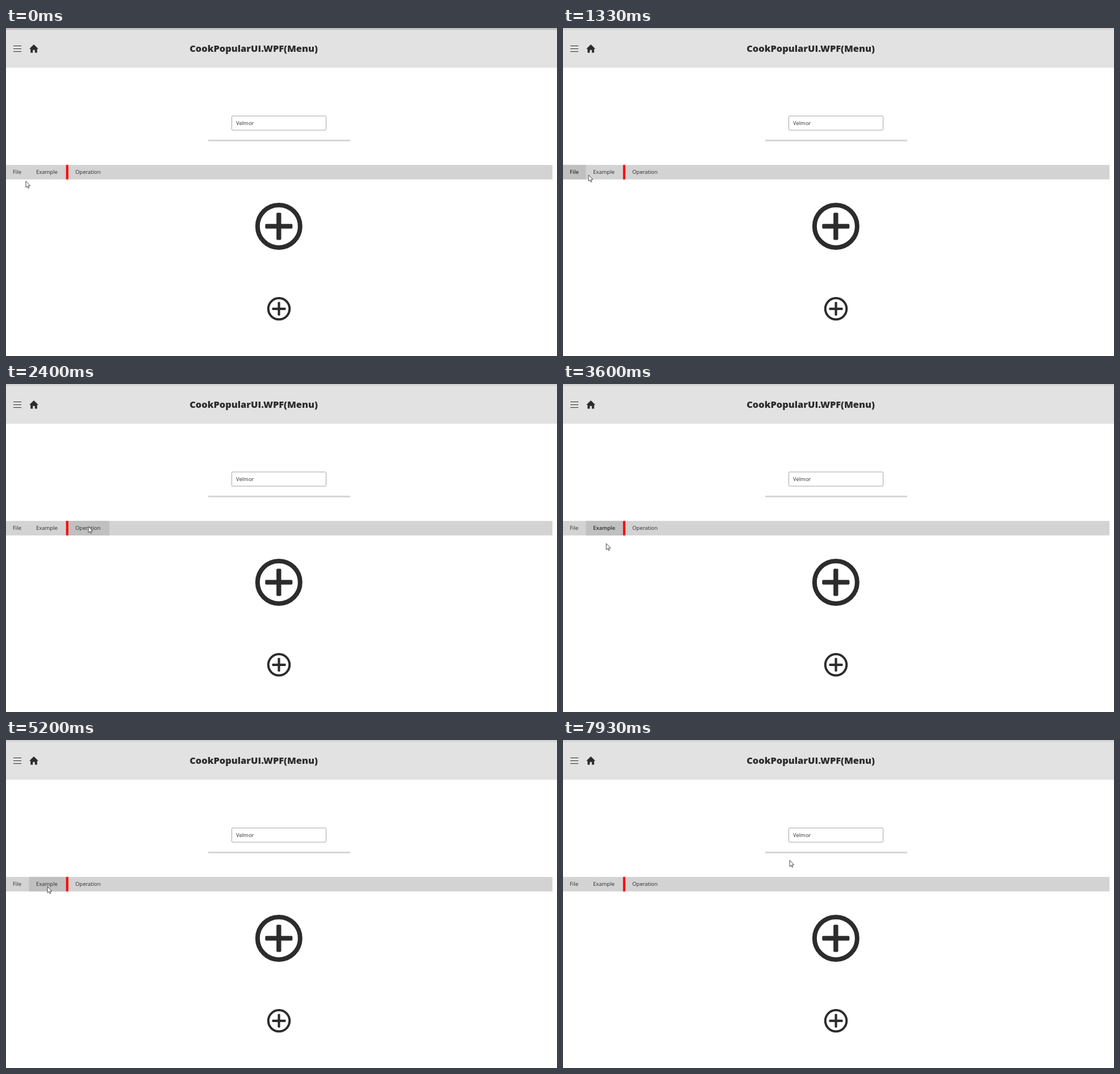
An HTML page for the animation above (8000 ms loop, 970 by 578 pixels).

```html
<!DOCTYPE html>
<html lang="en">
<head>
<meta charset="utf-8">
<title>Menu</title>
<style>
  html, body { margin: 0; width: 100%; height: 100%; overflow: hidden; background: #fff; }
  svg { display: block; width: 970px; height: 578px; }
  text { font: 9.45px "Open Sans", "Noto Sans CJK SC", "Noto Sans CJK", sans-serif; fill: #2c2c2c; }
  .title { font-size: 16.4px; font-weight: 800; text-anchor: middle; }
  .cjk { font-size: 10px; }
  .popup { filter: drop-shadow(0 1px 1px rgba(0, 0, 0, .35)); }
</style>
</head>
<body>
<svg viewBox="0 0 970 578">
  <defs>
    <clipPath id="belowBar"><rect y="262.5" width="970" height="316"/></clipPath>
    <clipPath id="fileItem"><rect y="241.3" width="40.5" height="25.5"/></clipPath>
    <g id="plus">
      <circle r="37.5" fill="none" stroke="#2c2c2c" stroke-width="8"/>
      <rect x="-24" y="-4.2" width="48" height="8.4" rx="2" fill="#2c2c2c"/>
      <rect x="-4.2" y="-24" width="8.4" height="48" rx="2" fill="#2c2c2c"/>
    </g>
  </defs>

  <rect width="970" height="70" fill="#e2e2e2"/>
  <rect id="strip" width="970" height="3.3"/>
  <path d="M13 31.5H27M13 36.5H27M13 41.5H27" stroke="#2c2c2c" stroke-width="1.2"/>
  <path d="M49 29 57 36.8H54.8V43.6H50.8V38.8H47.2V43.6H43.2V36.8H41Z" fill="#2c2c2c"/>
  <text class="title" x="436" y="42">CookPopularUI.WPF(Menu)</text>

  <rect x="397.5" y="155" width="166" height="25" rx="1.5" fill="#fff" stroke="#a3a3a3"/>
  <text x="405" y="171">Velmor</text>
  <rect x="356" y="196.8" width="250" height="2.8" fill="#d3d3d3"/>

  <rect y="241.3" width="962" height="25.5" fill="#d3d3d3"/>
  <g id="highlights" fill="#c0c0c0"></g>
  <g clip-path="url(#fileItem)"><circle id="ripple" cx="24" cy="254" fill="#d3d3d3"/></g>
  <rect x="105.7" y="241.3" width="4.1" height="25.5" fill="#f00"/>
  <g id="labels"></g>

  <use href="#plus" transform="translate(480.3 349.4)"/>
  <use href="#plus" transform="translate(480.5 494.8) scale(.5)"/>

  <g id="popups" clip-path="url(#belowBar)"></g>
  <path id="cursor" d="M0 0V11L2.5 8.7 4.2 12.5 5.8 11.8 4.2 8.1H7.7Z" fill="#fff" stroke="#333" stroke-width=".9"/>
</svg>
<script>
const LOOP = 8000, MOVE = 400, FADE = 130, SLIDE = 185;
const BAR_TOP = 241.3, BAR_HEIGHT = 25.5, ROW = 26, POPUP_TOP = 262;
const byId = id => document.getElementById(id);

const items = [
  { name: "File", x: 0, w: 40.5, textX: 12 },
  { name: "Example", x: 40.5, w: 65.5, textX: 53 },
  { name: "Operation", x: 110, w: 72, textX: 122 },
];
const [file, example, operation] = items;
const presses = [
  { item: file, from: 530, to: 1400 },
  { item: example, from: 1400, to: 1870 },
  { item: example, from: 3000, to: 4740 },
  { item: operation, from: 5330, to: 6470 },
];
const popups = [
  { x: 0, w: 122, open: 775, close: 1270,
    rows: ["Select Physical Define File", "Clear File Name List", "展示选择过的文件", "Exit"] },
  { x: 40, w: 82, open: 1530, close: 1870,
    rows: Array.from({ length: 7 }, (_, i) => "Example " + (i + 1)) },
];
// Pointer stops: arrival time, x, y. Each move takes at most MOVE ms.
const stops = [
  [0, 35, 270], [330, 24, 254], [1330, 45, 259], [1870, 61, 251], [2400, 145, 251],
  [2850, 68, 248], [3900, 100, 379], [4270, 169, 263], [4530, 109, 367], [5070, 39, 258],
  [5470, 143, 259], [6800, 241, 341], [7200, 151, 275], [7570, 275, 243], [7930, 399, 212],
];

function add(parent, tag, attrs, text = "") {
  const el = document.createElementNS("http://www.w3.org/2000/svg", tag);
  for (const key in attrs) el.setAttribute(key, attrs[key]);
  el.textContent = text;
  return parent.appendChild(el);
}

for (const item of items) {
  item.box = add(byId("highlights"), "rect", { x: item.x, y: BAR_TOP, width: item.w, height: BAR_HEIGHT });
  item.label = add(byId("labels"), "text", { x: item.textX, y: 257.2 }, item.name);
}
for (const popup of popups) {
  const { x, w, rows } = popup;
  popup.el = add(byId("popups"), "g", { class: "popup" });
  add(popup.el, "rect", { x, width: w, height: rows.length * ROW, fill: "#d3d3d3" });
  rows.forEach((row, i) => {
    if (i) add(popup.el, "rect", { x, y: i * ROW, width: w, height: 1.2, fill: "#808080" });
    add(popup.el, "text", { x: x + 5, y: i * ROW + 16.7, class: /[^\x00-\x7f]/.test(row) ? "cjk" : "" }, row);
  });
}

const clamp = v => Math.max(0, Math.min(1, v));

function pointer(t) {
  const i = stops.findIndex(stop => stop[0] > t);
  if (i < 1) return stops.at(i).slice(1);
  const [t0, x0, y0] = stops[i - 1], [t1, x1, y1] = stops[i];
  const start = Math.max(t0, t1 - MOVE);
  const p = clamp((t - start) / (t1 - start));
  return [x0 + (x1 - x0) * p, y0 + (y1 - y0) * p];
}

const pressedItem = t => presses.find(({ from, to }) => t >= from && t < to)?.item;

function hoveredItem(t) {
  const [x, y] = pointer(t);
  const onBar = y > BAR_TOP && y < BAR_TOP + BAR_HEIGHT;
  return onBar ? items.find(item => x >= item.x && x < item.x + item.w) : undefined;
}

// A highlight fades with the share of the last FADE ms its item was active.
function highlight(item, t) {
  const samples = 12;
  let active = 0;
  for (let i = 0; i < samples; i++) {
    const past = Math.max(0, t - FADE * i / samples);
    if ((pressedItem(past) ?? hoveredItem(past)) === item) active++;
  }
  return active / samples;
}

function draw(t) {
  byId("strip").setAttribute("fill", t < presses[0].from ? "#bfbfbf" : "#d3d3d3");
  for (const item of items) {
    item.box.setAttribute("opacity", highlight(item, t));
    item.label.style.fontWeight = pressedItem(t) === item ? 600 : 400;
  }
  for (const { el, open, close, rows } of popups) {
    const hidden = (1 - clamp((t - open) / SLIDE)) ** 3 * rows.length * ROW;
    el.setAttribute("transform", `translate(0 ${POPUP_TOP - hidden})`);
    el.style.display = t >= open && t < close ? "" : "none";
  }
  const spread = clamp((t - popups[0].open) / 400);
  byId("ripple").setAttribute("r", spread * 42);
  byId("ripple").setAttribute("opacity", spread ? (1 - spread) * .8 : 0);
  byId("cursor").setAttribute("transform", `translate(${pointer(t)})`);
}

function tick() {
  draw(performance.now() % LOOP);
  requestAnimationFrame(tick);
}
tick();
</script>
</body>
</html>
```
